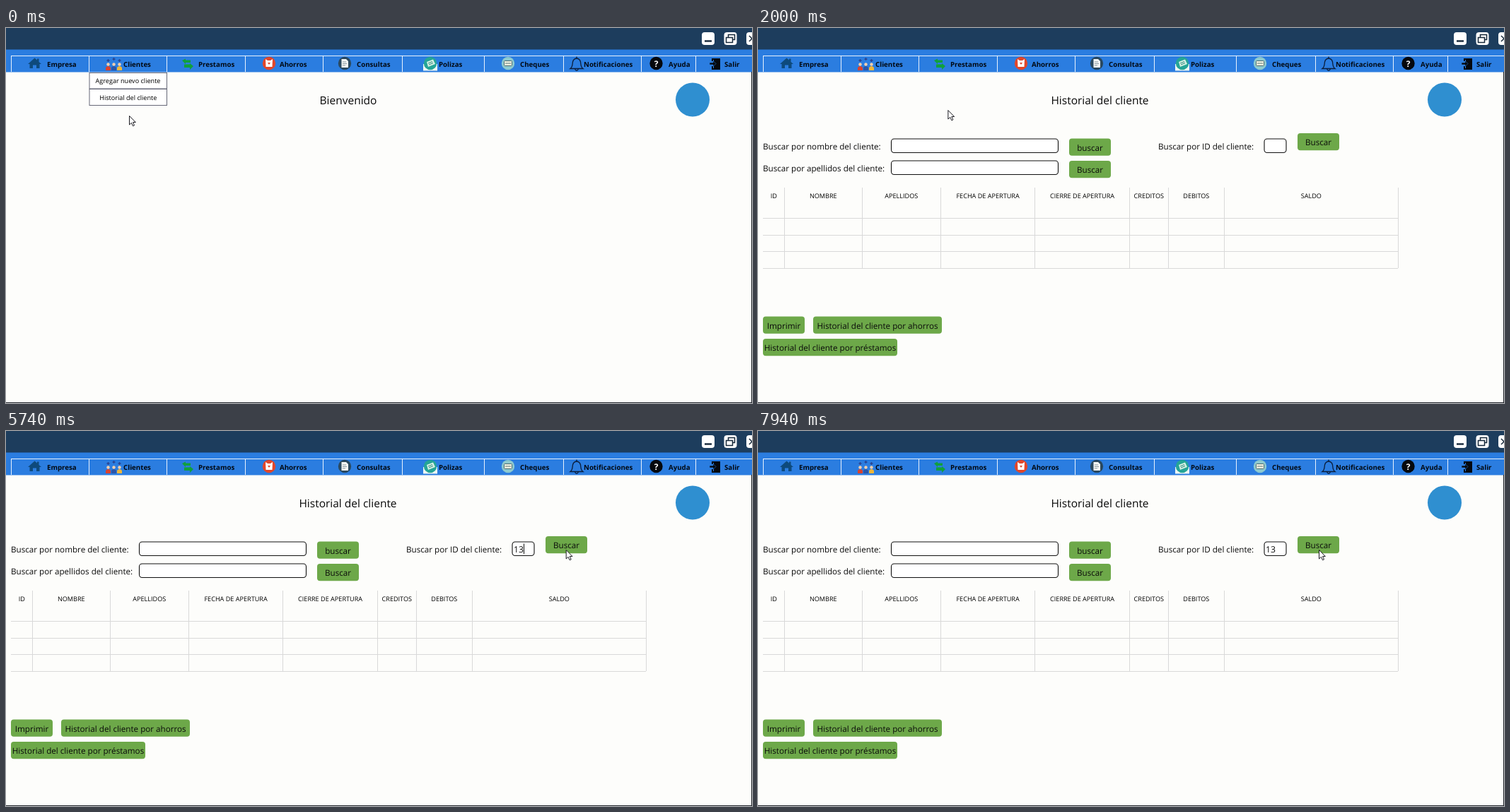
An HTML page for the animation above (8 s loop, 1055 by 531 pixels).

```html
<!DOCTYPE html>
<html lang="es">
<head>
<meta charset="utf-8">
<title>Historial del cliente</title>
<style>
html, body { margin: 0; width: 100%; height: 100%; overflow: hidden; background: #fdfdfb; }
svg { display: block; width: 1055px; height: 531px; }
text { font-family: "Open Sans", "Noto Sans", sans-serif; fill: #0a0a0a; text-rendering: geometricPrecision; }
.menu { font-size: 9.7px; font-weight: 700; fill: #020a14; }
.title { font-size: 15.5px; }
.body { font-size: 11.65px; }
.small { font-size: 9.1px; fill: #000; }
.mid { text-anchor: middle; }
</style>
</head>
<body>
<svg viewBox="0 0 1055 531">
  <rect width="1055" height="531" fill="#fdfdfb"/>
  <rect width="1055" height="31" fill="#1d3d5d"/>
  <rect y="30.5" width="1055" height="32" fill="#2b7de0"/>
  <path d="M1054.5 62V531M0 530.5H1055" stroke="#22262c"/>

  <g id="window"></g>
  <path d="M988 18.500H998" stroke="#16283a" stroke-width="2.400"/>
  <g fill="#fff" stroke="#16283a" stroke-width="1.500">
    <rect x="1021.500" y="9.500" width="9" height="7"/>
    <rect x="1018.500" y="13.500" width="9" height="7"/>
    <path d="M1051 11L1059 19M1051 19L1059 11"/>
  </g>

  <g id="menu"></g>

  <!-- menu icons -->
  <path d="M31 51L40.500 42.500L44 45.600V43.500H46.500V48L50 51H47.500V57H43V52.500H38V57H33.500V51Z" fill="#0e4a7c"/>
  <g id="people"></g>
  <path d="M249 46L254 43.500V45.500H261V49H254V51ZM265 54L260 59V56H252V51.500H260V50Z" fill="#10a03c"/>
  <g id="discs"></g>
  <path d="M367 44L370 46H374L377 44L376.500 55H367.500Z" fill="#fff"/>
  <path d="M370 49H374L372 52Z" fill="#e1472b"/>
  <path d="M474.500 44H481L484 47V56H474.500Z" fill="#f3f5f4"/>
  <path d="M476 48H481M476 50.500H482M476 53H480" stroke="#8a99a1"/>
  <path d="M595 48L604 44.500L607 51L597 55Z" fill="#d7f1e4"/>
  <path d="M597 50L603 47.500M598 52L604 49.500" stroke="#25877c"/>
  <rect x="704.500" y="46.500" width="11" height="7" rx="1" fill="#edf1df" stroke="#4b6970"/>
  <path d="M706 50H714" stroke="#5f7478"/>
  <path d="M798 57.500C801.500 55 801 51 801.500 48Q802.500 43.500 807 43Q811.500 43.500 812.500 48C813 51 812.500 55 816 57.500ZM804.500 58Q807 62.500 809.500 58M807 43V40.500" fill="none" stroke="#0b1e3c" stroke-width="1.300"/>
  <text x="919.500" y="55" class="mid" style="font-size:12px;font-weight:700;fill:#fff">?</text>
  <path d="M998 43H1010V59H998V54H1000V57H1001V45H1000V47H998Z" fill="#05080d"/>
  <path d="M995 49H1000V46.500L1004 50.500L1000 54.500V52H995Z" fill="#05080d" stroke="#2b7de0" stroke-width=".6"/>

  <circle cx="971" cy="101.500" r="24" fill="#2f8fd0"/>

  <g id="home">
    <text x="484" y="108" class="title mid">Bienvenido</text>
    <g fill="#fff" stroke="#666878">
      <rect x="118" y="63.500" width="109.500" height="22.500"/>
      <rect x="118" y="86.500" width="109.500" height="23"/>
    </g>
    <text x="172.500" y="78" class="small mid">Agregar nuevo cliente</text>
    <text x="172.800" y="101.500" class="small mid">Historial del cliente</text>
  </g>

  <g id="history">
    <text x="483.500" y="108" class="title mid">Historial del cliente</text>
    <text x="7" y="171.500" class="body">Buscar por nombre del cliente:</text>
    <text x="7" y="203" class="body">Buscar por apellidos del cliente:</text>
    <text x="566" y="171.500" class="body">Buscar por ID del cliente:</text>
    <g id="form"></g>
    <g id="table"></g>
    <text id="typed" x="718" y="172" style="font-size:12.200px"></text>
    <path id="caret" stroke="#111"/>
  </g>

  <circle id="ring" fill="#f4f0a0" fill-opacity=".15" stroke="#c9c573" stroke-opacity=".7" stroke-width="1.800"/>
  <path id="arrow" d="M.5 .5V13L3.400 10.300L5.500 14.800L7.500 13.900L5.500 9.500H9.300Z" fill="#fff" stroke="#1c1c22"/>
  <path id="beam" d="M-2.500 -5.500H-.5L0 -5L.5 -5.500H2.500M0 -5V5.500M-2.500 6H-.5L0 5.500L.5 6H2.500" fill="none"/>
</svg>
<script>
const LOOP = 8000;
const $ = id => document.getElementById(id);

function add(parent, tag, attrs, content) {
  const el = document.createElementNS('http://www.w3.org/2000/svg', tag);
  for (const k in attrs) el.setAttribute(k, attrs[k]);
  if (content) el.textContent = content;
  $(parent).append(el);
}

const box = (parent, x, y, width, height, attrs) =>
  add(parent, 'rect', { x, y, width, height, rx: 4, ...attrs });
const verticals = (xs, top, bottom) => xs.map(x => `M${x + .5} ${top}V${bottom}`).join('');

for (let i = 0; i < 3; i++) box('window', 984 + 31.5 * i, 6, 18, 18, { fill: '#fff' });

// Menu: left border and label position
const menu = {
  Empresa: [7, 58], Clientes: [117, 166], Prestamos: [227, 272], Ahorros: [338, 387],
  Consultas: [448, 496], Polizas: [560, 612], Cheques: [676, 727],
  Notificaciones: [788, 817], Ayuda: [898, 937], Salir: [975, 1016]
};
const cells = Object.values(menu).map(([left]) => left);
add('menu', 'path', { d: 'M7 39.5H1055' + verticals(cells, 39, 62), stroke: '#e9f2fd' });
for (const label in menu) add('menu', 'text', { x: menu[label][1], y: 54.7, class: 'menu' }, label);

['#d8432f', '#2c56a8', '#eeb63b'].forEach((fill, i) => {
  const x = 144.5 + 8 * i, y = 46 - 2 * (i % 2);
  add('people', 'path', { d: `M${x - 3.5} 60V56Q${x} 52 ${x + 3.5} 56V60Z`, fill });
  add('people', 'circle', { cx: x, cy: 51.5, r: 2.2, fill: '#f3cfae' });
  add('people', 'path', { d: `M${x - 2} ${y}h4m-2 -2v4`, stroke: '#29438f', 'stroke-width': 1.3 });
});

box('discs', 590, 51, 20, 9.5, { rx: 0, fill: '#eef7f3' });
const discs = { 372: '#e1472b', 479: '#29485f', 600: '#25a597', 710: '#8cc9cf', 919.5: '#05080d' };
for (const cx in discs) add('discs', 'circle', { cx, cy: 50, r: 9.2, fill: discs[cx] });

function input(x, y, width) {
  box('form', x + .5, y, width - 1, 19.5, { fill: '#fff', stroke: '#111', 'stroke-width': 1.1 });
}
input(188, 157, 237);
input(188, 188, 237);
input(715.5, 157, 32);

function button(x, y, label, width = 59) {
  box('form', x, y, width, 24.3, { fill: '#6da849' });
  add('form', 'text', { x: x + width / 2, y: y + 17, class: 'body mid' }, label);
}
button(440, 156.5, 'buscar');
button(440, 188, 'Buscar');
button(763, 149, 'Buscar');
button(7, 408.5, 'Imprimir');
button(78, 408.5, 'Historial del cliente por ahorros', 182);
button(7, 440, 'Historial del cliente por préstamos', 190);

// Table: heading and column width
const columns = {
  ID: 30, NOMBRE: 110, APELLIDOS: 111, 'FECHA DE APERTURA': 133.5,
  'CIERRE DE APERTURA': 133.5, CREDITOS: 55, DEBITOS: 79, SALDO: 246
};
let left = 7;
for (const label in columns) {
  const width = columns[label];
  add('table', 'text', { x: left + width / 2 + .3, y: 240.7, class: 'small mid' }, label);
  left += width;
  add('table', 'path', { d: verticals([Math.floor(left)], 226, 340), stroke: '#d9d9d9' });
}
for (let row = 0; row < 4; row++)
  add('table', 'path', { d: `M7 ${Math.round(269 + 23.7 * row) + .5}H905`, stroke: '#d9d9d9' });

// Pointer moves, each eased from where the last one ended
const start = { x: 174, y: 124 };
const moves = [
  { from: 170, to: 900, x: 171, y: 105 },
  { from: 2000, to: 3640, x: 737, y: 169 },
  { from: 5440, to: 6000, x: 793, y: 168 }
];
const STEP = 100, BLINK = 530, RING = 300;
const PAGE = 1600, FOCUS = 3840, keys = [4740, 5300], clicks = [1050, 6100];

const easeOut = p => 1 - (1 - p) ** 3;

function pointerAt(t) {
  let { x, y } = start;
  for (const m of moves) {
    const elapsed = Math.ceil((t - m.from) / STEP) * STEP;
    const p = easeOut(Math.min(1, Math.max(0, elapsed / (m.to - m.from))));
    x += (m.x - x) * p;
    y += (m.y - y) * p;
  }
  return { x, y };
}

const show = (id, on) => $(id).setAttribute('visibility', on ? 'visible' : 'hidden');

function draw(t) {
  const { x, y } = pointerAt(t);
  const overField = x > 716 && x < 790;
  show('beam', overField);
  show('arrow', !overField);
  for (const id of ['arrow', 'beam', 'ring']) $(id).setAttribute('transform', `translate(${x} ${y})`);
  $('beam').setAttribute('stroke', x > 762 ? '#59655a' : '#1c1c22');

  show('home', t < PAGE);
  show('history', t >= PAGE);

  const typed = '13'.slice(0, keys.filter(k => k <= t).length);
  $('typed').textContent = typed;

  // The caret blinks anew after focus and after each key
  const lastInput = [FOCUS, ...keys].findLast(k => k <= t);
  show('caret', t < clicks[1] && (t - lastInput) % (2 * BLINK) < BLINK);
  $('caret').setAttribute('d', `M${718.5 + typed.length * 7} 159.5V174`);

  const age = t - clicks.findLast(c => c <= t);
  show('ring', age < RING);
  if (age < RING) $('ring').setAttribute('r', 8 + age / 30);
}

const begin = performance.now();
function tick() {
  draw((performance.now() - begin) % LOOP);
  requestAnimationFrame(tick);
}
tick();
</script>
</body>
</html>
```
